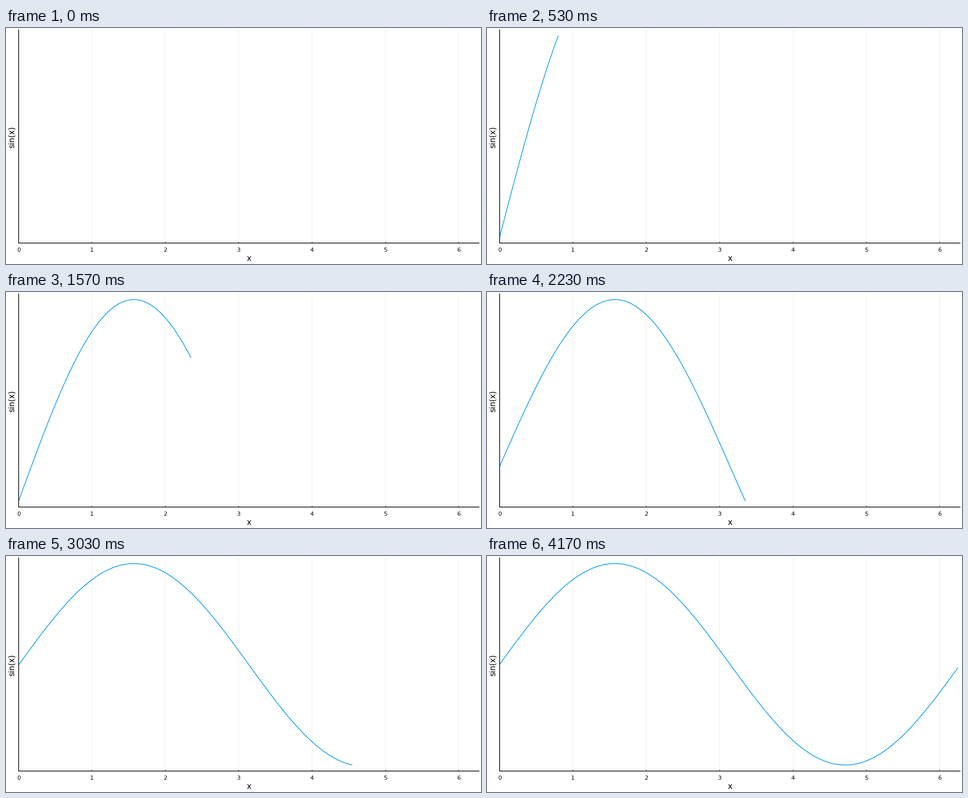
These frames come from a looping animation (921x460 px, 4210 ms). A matplotlib script:

```python
import numpy as np
import matplotlib.pyplot as plt
from matplotlib.animation import FuncAnimation

plt.rcParams["font.family"] = "DejaVu Sans"

W, H, DPI = 921, 460, 64
PT = 72 / DPI                       # points per pixel
LEFT, RIGHT, TOP, BOTTOM = 24.5, 918, 3, 419.2
UNIT = 142.2                        # pixels per unit of x
PAD = 0.03                          # share of the data range left free
TICK_MS, LOOP_MS = 10, 4210

xs = np.arange(126) * 0.05
ys = np.sin(xs)

fig = plt.figure(figsize=(W / DPI, H / DPI), dpi=DPI, facecolor="white")
ax = fig.add_axes([0, 0, 1, 1])
ax.set_xlim(0, W)
ax.set_ylim(H, 0)
ax.axis("off")


def stroke(x, y, width, color="black", **kw):
    return ax.plot(x, y, color=color, lw=width * PT, snap=False,
                   solid_capstyle="butt", **kw)[0]


def label(x, y, text, size, **kw):
    ax.text(x, y, text, fontsize=size * PT, ha="center", va="baseline",
            rotation_mode="anchor", **kw)


for n in range(7):
    px = LEFT + n * UNIT
    if n:
        stroke([px, px], [TOP, BOTTOM], 0.7, alpha=0.1)
        stroke([px, px], [BOTTOM - 3, BOTTOM], 0.7, zorder=4)
    label(px, 436, str(n), 11.1)

stroke([LEFT, LEFT, RIGHT], [TOP, BOTTOM, BOTTOM], 1.39,
       solid_joinstyle="miter", zorder=4)
label((LEFT + RIGHT) / 2, 454, "x", 15.28)
label(16, 212.5, "sin(x)", 15.28, rotation=90)
curve = stroke([], [], 1.39, "#009AF9", zorder=3)


def update(tick):
    # 30 steps per second, rounded to hundredths of a second
    step = min((3 * tick + 1) // 10, len(xs) - 1)
    if step == 0:
        curve.set_data([], [])
        return curve,
    x, y = xs[:step + 1], ys[:step + 1]
    low, span = y.min(), np.ptp(y)
    share = ((y - low) / span + PAD) / (1 + 2 * PAD)
    curve.set_data(LEFT + x * UNIT, BOTTOM - share * (BOTTOM - TOP))
    return curve,


anim = FuncAnimation(fig, update, frames=LOOP_MS // TICK_MS,
                     interval=TICK_MS, repeat=True, repeat_delay=0)
plt.show()
```
